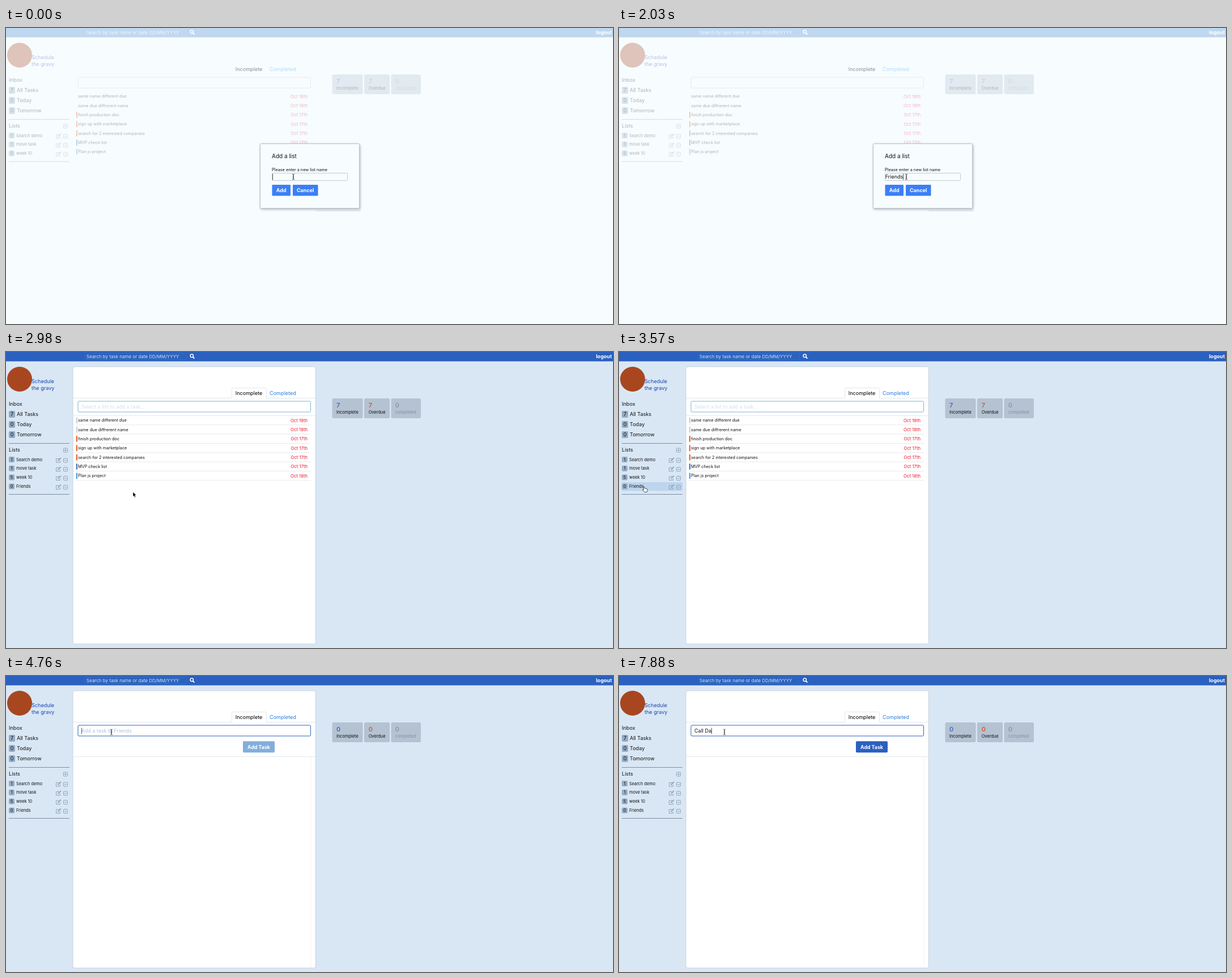
An HTML page that plays this animation: 1071x523 px, repeating every 8 s.

```html
<!DOCTYPE html>
<html lang="en">
<head>
<meta charset="utf-8">
<title>Task list</title>
<style>
  html, body { margin: 0; width: 100%; height: 100%; overflow: hidden; background: #d9e7f5; }
  svg { display: block; width: 1071px; height: 523px; }
  text { font-family: Inter, "Open Sans", sans-serif; white-space: pre; }
</style>
</head>
<body>
<svg id="stage" viewBox="0 0 1071 523"></svg>
<script>
const LOOP = 8000;
const BLUE = '#2a60bf', LINK = '#2a7de1', RED = '#e8470f', PALE = '#f7fcff';
const stage = document.getElementById('stage');
const pen = document.createElement('canvas').getContext('2d');

const rect = (x, y, w, h, fill, more = '') =>
  `<rect x="${x}" y="${y}" width="${w}" height="${h}" fill="${fill}" ${more}/>`;
const box = (x, y, w, h, stroke, fill = 'none', r = 2) =>
  rect(x, y, w, h, fill, `stroke="${stroke}" rx="${r}"`);
const path = (d, stroke, fill = 'none', more = '') =>
  `<path d="${d}" stroke="${stroke}" fill="${fill}" ${more}/>`;
const group = (body, more) => `<g ${more}>${body}</g>`;
// y is the middle of the capitals
const text = (x, y, size, str, fill = '#111', more = '') =>
  `<text x="${x}" y="${(y + size * 0.36).toFixed(2)}" font-size="${size}" fill="${fill}" ${more}>${str}</text>`;
const BOLD = 'font-weight="700"', MID = 'text-anchor="middle"', END = 'text-anchor="end"';

function caret(x, y, str, size) {
  pen.font = `${size}px Inter, "Open Sans", sans-serif`;
  return rect(Math.round(x + pen.measureText(str).width), y, 1, 11, '#555');
}

// last entry whose time has passed
const at = (t, keys) => keys.reduce((v, [time, value]) => t >= time ? value : v, keys[0][1]);
// progress between two times, held in n equal steps
const steps = (t, from, to, n) =>
  Math.min(1, Math.max(0, Math.floor((t - from) / (to - from) * n + 1e-6) / n));
const swing = p => 0.5 - 0.5 * Math.cos(Math.PI * Math.min(1, Math.max(0, p)));

const TASKS = [
  ['same name different due', '19', '#c4c8cc'],
  ['same due diffrerent name', '18', '#c4c8cc'],
  ['finish production doc', '17', RED],
  ['sign up with marketplace', '17', RED],
  ['search for 2 interested companies', '17', RED],
  ['MVP check list', '17', BLUE],
  ['Plan js project', '18', '#2f93e0']
];
const LISTS = [['Search demo', 1], ['move task', 1], ['week 10', 5], ['Friends', 0]];

function header(fill, field, edge, hint) {
  return rect(0, 0, 1071, 16.5, fill) +
    box(139.5, 2.5, 179, 11, edge, field) +
    text(142, 7.7, 8, 'Search by task name or date DD/MM/YYYY', hint) +
    '<circle cx="327.8" cy="6.8" r="2.7" fill="none" stroke="#fff" stroke-width="1.5"/>' +
    path('M329.8 8.9L332.4 11.5', '#fff', 'none', 'stroke-width="1.8"') +
    text(1069, 7.7, 9, 'logout', '#fff', BOLD + ' ' + END);
}

function signBox(y, plus) {
  return box(101.5, y - 3.5, 7, 7, '#8fa3b8', 'none', 1) +
    path(`M103 ${y}h4` + (plus ? `M105 ${y - 2}v4` : ''), '#8fa3b8');
}

function editIcon(y) {
  return path(`M94 ${y - 2.5}h-5.5v6.5h7v-3`, '#8fa3b8') +
    path(`M91.5 ${y + 1.5}l5.5-5.5`, '#8fa3b8', 'none', 'stroke-width="1.8"');
}

const rule = y => path(`M5 ${y}H112`, '#56677c', 'none', 'stroke-dasharray="1.2 .5"');

function sidebar(count, hover) {
  let s = '<circle cx="24" cy="48" r="22" fill="#a8471f"/>' +
    text(45, 51.5, 9.1, 'Schedule', '#1d45ad') + text(45, 63.7, 9.1, 'the gravy', '#1d45ad') +
    text(5, 92, 9.1, 'Inbox');
  [['All Tasks', 7], ['Today', 0], ['Tomorrow', 0]].forEach(([name, n], i) => {
    const y = 110 + i * 18;
    s += rect(5, y - 6, 11, 12, '#93abc3', 'rx="2"') +
      text(10.5, y, 9, n, '#111', MID) + text(19, y, 9.1, name);
  });
  s += rule(161.5) + text(5, 173, 9.1, 'Lists') + signBox(173.5, true);
  LISTS.slice(0, count).forEach(([name, n], i) => {
    const y = 190 + i * 15.8;
    if (hover && i === 3) s += rect(5, 230, 107, 15.5, '#bdd5ed');
    s += rect(5, y - 5, 10, 10, '#93abc3', 'rx="2"') +
      text(10, y, 7.4, n, '#111', MID) + text(18, y, 7.35, name) +
      editIcon(y + 1) + signBox(y + 1.5);
  });
  return s + rule(count > 3 ? 251.5 : 236);
}

function stats(n) {
  return [[575.5, 54, 583, n, 'Incomplete', BLUE, '#111'],
    [632, 45, 639.7, n, 'Overdue', '#dd4a17', '#111'],
    [679.5, 52.5, 686.7, 0, 'completed', '#8391a2', '#8391a2']]
    .map(([x, w, tx, v, label, c1, c2]) =>
      rect(x, 82, w, 35, '#b4c2d2', 'rx="2.5"') +
      text(tx, 94, 11, v, c1, 'font-weight="500"') + text(tx, 106.7, 7.4, label, c2)).join('');
}

function panel() {
  return box(118, 26, 428.5, 490, '#c6d1dc', '#fff', 3) +
    path('M118.5 81.5H398.5V65.5q0-2 2-2H457.5q2 0 2 2V81.5H546', '#e2e6ea');
}

function tasks(lines) {
  return TASKS.map(([name, day, color], i) => {
    const y = 120.8 + i * 16.33;
    const grey = color === '#c4c8cc';
    return (lines ? path(`M123 ${(y + 8).toFixed(1)}H538`, '#e6e9ec') : '') +
      (lines || !grey ? rect(124, y - 5.3, 1.8, 10.6, color) : '') +
      text(127, y, 7.3, name) + text(532, y, 7.7, `Oct ${day}th`, '#f5102a', END);
  }).join('');
}

const tabs = (first, second) =>
  text(404.7, 72.3, 9.1, 'Incomplete', first) + text(465, 72.3, 9.1, 'Completed', second);

const ibeam = (x, y) =>
  path(`M${x - 2} ${y - 5}q2 0 2 1.5v7q0 1.5-2 1.5M${x + 2} ${y - 5}q-2 0-2 1.5v7q0 1.5 2 1.5M${x - 1} ${y + 1}h2`,
    '#333', 'none', 'stroke-width=".8"');

function arrow(x, y) {
  return path(`M${x} ${y}v8.3l1.9-1.7 1.3 3 1.5-.7-1.3-2.9h2.6z`, '#fff', '#000', 'stroke-width=".6"');
}

function hand(x, y) {
  return path(`M${x - 1} ${y}q1-1 1.7.3l.6 3 1-.4 1 .5 1-.2.9.7q.9 0 .9 1l-.2 2.6-.9 2.2h-4l-3.4-4.2q.2-1.4 1.8 0z`,
    '#222', '#fff', 'stroke-width=".8"');
}

function dialog(t) {
  const name = at(t, [[0, ''], [530, 'F'], [1580, 'Fr'], [1730, 'Frie'], [1880, 'Frien'], [2030, 'Friends']]);
  const blink = t >= 1130 && t < 1580;
  const button = (x, w, label) => rect(x, 277, w, 19.5, '#3b7ff5', 'rx="1"') +
    text(x + w / 2, 286.7, 9, label, '#fff', BOLD + ' ' + MID);
  return rect(448, 204, 176, 115, '#8794a0', 'rx="3" opacity=".7" filter="url(#blur)"') +
    rect(546, 320, 80, 4, '#d3dade', 'rx="2" opacity=".6"') +
    box(448.5, 204.5, 175, 114, '#bcc0c4', PALE, 2) +
    text(469, 226.8, 10, 'Add a list') +
    text(469, 250.3, 7.28, 'Please enter a new list name') +
    box(469.5, 256.5, 133, 13, '#c6cace', PALE, 1) +
    text(469.7, 262.8, 9, name) +
    (blink ? '' : caret(469.7, 257.5, name, 9)) +
    button(469.5, 32.5, 'Add') + button(506, 44.5, 'Cancel') +
    ibeam(507, 263);
}

function dimmed(t) {
  return rect(0, 0, 1071, 523, PALE) +
    header('#bfd7ef', '#bfd7ef', '#c4dbf2', '#f4f9fe') +
    group(sidebar(3) + tasks(false) + stats(7) + box(127, 87, 410.5, 19, '#b7c6d3'), 'opacity=".3"') +
    tabs('#8b9095', '#b5dbf8') + dialog(t);
}

function entry(t) {
  const frame = at(t, [[0, 0], [4460, 4460], [4610, 4610], [4760, 4760]]);
  const edge = 112.5 + 30 * swing((frame - 4360) / 400);
  const str = at(t, [[0, ''], [5500, 'C'], [5650, 'Ca'], [5800, 'Cal'], [5940, 'Call'],
    [6090, 'Call '], [6990, 'Call D'], [7880, 'Call Da']]);
  const opened = t >= 3720, focus = t >= 4310;
  const hint = opened ? 'Add a task to Friends' : 'Select a list to add a task...';
  const off = (t >= 5200 && t < 5500) || (t >= 6690 && t < 6990) || (t >= 7730 && t < 7880);
  let s = box(127, 87, 410.5, 19, focus ? BLUE : '#7fb2dd', '#fff') +
    (str ? text(133, 96.8, 9, str) : text(133, 96.8, 8.9, hint, opened ? '#a9c3e3' : '#cfe0f0')) +
    (focus && !off ? caret(133, 91.5, str, 9) : '') +
    path(`M118.5 ${edge.toFixed(1)}H546`, '#e4e8eb');
  if (!opened) return s + tasks(true);
  s += path(`M538 ${edge.toFixed(1)}V515.5`, '#f0f2f4');
  if (edge > 113) {
    s += `<clipPath id="slide">${rect(119, 107, 427, edge - 107, '#fff')}</clipPath>` +
      group(rect(418, 115.3, 56, 20, str ? BLUE : '#82aedd', 'rx="2"') +
        text(446, 125.7, 8.8, 'Add Task', '#fff', BOLD + ' ' + MID), 'clip-path="url(#slide)"');
  }
  return s;
}

function pointer(t) {
  const a = steps(t, 2320, 3420, 7), b = steps(t, 3720, 4460, 5);
  const ea = swing(a), eb = swing(b);
  const x = 507 - 463 * ea + 142 * eb, y = 262 - 24 * ea - 139 * eb;
  if (b === 1) return ibeam(186, 99);
  return t >= 3420 && b === 0 ? hand(x, y) : arrow(x, y);
}

function full(t) {
  const hover = t >= 3420 && t < 3870;
  return rect(0, 0, 1071, 523, '#d9e7f5') + header(BLUE, '#2a62bd', '#2f70c6', '#d3e3f5') +
    sidebar(t < 2470 ? 3 : 4, hover) + panel() + tabs('#000', LINK) + entry(t) +
    stats(t < 3720 ? 7 : 0) + pointer(t);
}

const DEFS = '<defs><filter id="blur" x="-10%" y="-10%" width="120%" height="125%">' +
  '<feOffset dx="1" dy="1.5"/><feGaussianBlur stdDeviation="2"/></filter></defs>';
let shown = '';

function render(t) {
  const next = DEFS + (t < 2320 ? dimmed(t) : full(t));
  if (next !== shown) stage.innerHTML = shown = next;
}

const start = performance.now();
function tick() {
  render((performance.now() - start) % LOOP);
  requestAnimationFrame(tick);
}
tick();
</script>
</body>
</html>
```
